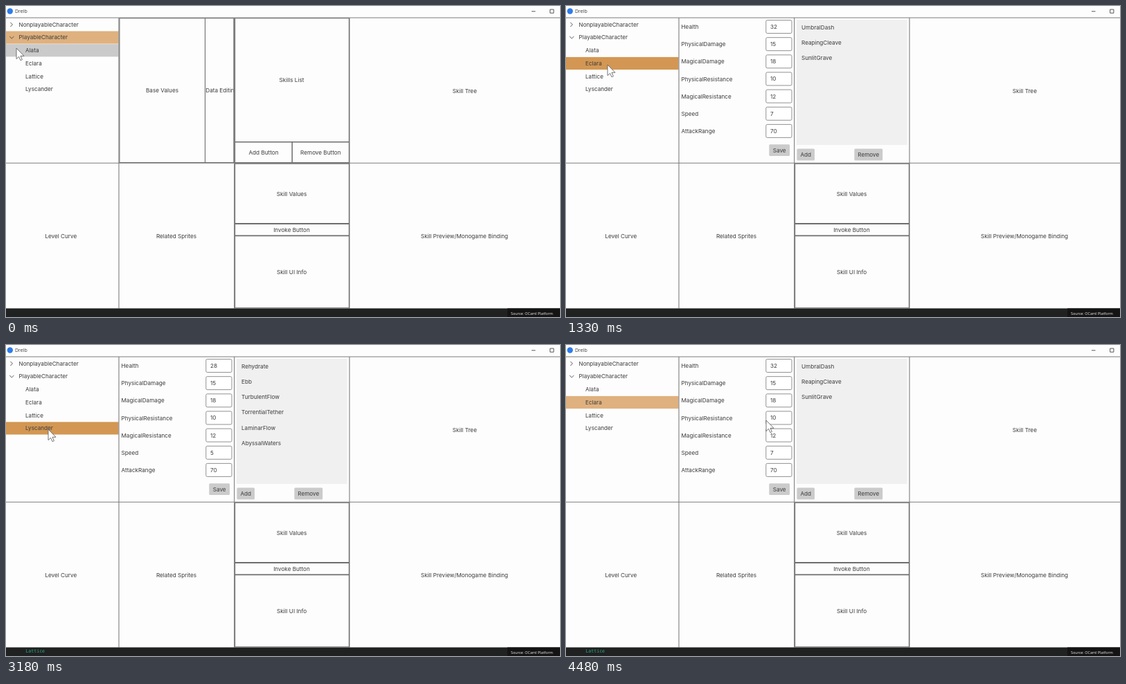
These frames come from a looping animation (800x450 px, 4.51 s). An HTML page:

```html
<!DOCTYPE html>
<html lang="en">
<head>
<meta charset="utf-8">
<title>Character editor</title>
<style>
  html, body { margin: 0; width: 100%; height: 100%; overflow: hidden; background: #fdfdfd; }
  svg { display: block; width: 100vw; height: 100vh; }
  text { font: 8.16px Inter, sans-serif; fill: #3c3c3c; white-space: pre; }
  .line { fill: none; stroke: #7d7d7d; stroke-width: 1.1; }
  .box { fill: none; stroke: #6e6e6e; stroke-width: 1.1; }
  .icon { fill: none; stroke: #444; stroke-width: .9; }
  .input { fill: #fff; stroke: #777; stroke-width: .8; }
  .button { fill: #cbcbcb; }
  text.title { font: 7px "Open Sans", sans-serif; }
  text.status { font: 5.45px "Open Sans", sans-serif; fill: #f2f2f2; }
  text.log { font: 6.6px "DejaVu Sans Mono", monospace; fill: #2fa88a; }
</style>
</head>
<body>
<svg id="stage" viewBox="0 0 800 450"></svg>
<script>
const LOOP = 4510;
const stage = document.getElementById('stage');

function add(tag, attrs, parent = stage) {
  const el = document.createElementNS('http://www.w3.org/2000/svg', tag);
  for (const key in attrs) el.setAttribute(key, attrs[key]);
  parent.appendChild(el);
  return el;
}
const group = () => add('g', {});
const path = (d, cls, parent) => add('path', { d, class: cls }, parent);
const rect = (x, y, width, height, attrs, parent) =>
  add('rect', { x, y, width, height, ...attrs }, parent);

// y is the middle of the capital letters
function label(str, x, y, attrs, parent) {
  const el = add('text', { x, y: y + 2.95, ...attrs }, parent);
  el.textContent = str;
  return el;
}
const centred = (str, x, y, parent) => label(str, x, y, { 'text-anchor': 'middle' }, parent);
const show = (el, on) => el.setAttribute('visibility', on ? 'visible' : 'hidden');

const STATS = ['Health', 'PhysicalDamage', 'MagicalDamage', 'PhysicalResistance',
  'MagicalResistance', 'Speed', 'AttackRange'];
const CHARACTERS = {
  Alata: { stats: [26, 6, 23, 5, 12, 6, 120], skills: ['Comatose', 'Daydream', 'Dreameater'] },
  Eclara: { stats: [32, 15, 18, 10, 12, 7, 70], skills: ['UmbralDash', 'ReapingCleave', 'SunlitGrave'] },
  Lattice: {
    stats: [70, 15, 18, 10, 12, 5, 70],
    skills: ['Refract', 'Anisotropy', 'Fracture', 'DimensionalPhase', 'DimensionalCollapse',
      'Tenebrescence', 'Rupture', 'Shatter']
  },
  Lyscander: {
    stats: [28, 15, 18, 10, 12, 5, 70],
    skills: ['Rehydrate', 'Ebb', 'TurbulentFlow', 'TorrentialTether', 'LaminarFlow', 'AbyssalWaters']
  }
};
const ROWS = ['NonplayableCharacter', 'PlayableCharacter', ...Object.keys(CHARACTERS)];
const rowY = i => 26.8 + 18.73 * i;

const CLICKS = [[0, 'PlayableCharacter'], [300, 'Alata'], [1270, 'Eclara'], [2240, 'Lattice'],
  [2940, 'Lyscander'], [3630, 'Lattice'], [4200, 'Eclara']];
const LOG_TIME = 2270;

// time, x, y of the pointer tip
const POINTER = [[0, 15, 61], [90, 15, 61], [280, 32, 63], [400, 34, 64], [610, 42, 72],
  [850, 56, 101], [1090, 60, 85], [1400, 60, 85], [1700, 66, 99], [1790, 67, 101],
  [2270, 67, 101], [2450, 64, 120], [2610, 61, 122], [3420, 61, 122], [3600, 62, 104],
  [3720, 62, 103], [3900, 64, 91], [4220, 64, 91], [4480, 289, 109], [LOOP, 289, 109]];

// title bar
rect(0, 0, 800, 450, { fill: '#fdfdfd' });
add('circle', { cx: 5.8, cy: 7.5, r: 4.2, fill: '#2f7be8' });
label('Drelb', 13, 7.2, { class: 'title' });
path('M759 7.8h5.5M785.7 5h5.2v5.2h-5.2z', 'icon');

// tree
const rowBars = ROWS.map((_, i) => rect(0, rowY(i) - 9.1, 162.5, 18.2, {}));
ROWS.forEach((name, i) => label(name, i < 2 ? 18.5 : 28, rowY(i)));
path('M6.4 23.8l3 3.1-3 3.1M5.2 44l3.1 3 3.1-3', 'icon');

// panes
path('M0 17H800M0 227.2H800M163 17V437.5M329.7 17V437.5M496 17V437.5', 'line');
path('M330.6 228.1H495.4V314.6H330.6zM330.6 315.4H495.4V332H330.6zM330.6 332.6H495.4V436.8H330.6z', 'box');
[['Skill Tree', 662.3, 123], ['Level Curve', 79.3, 333.3], ['Related Sprites', 246, 333.3],
  ['Skill Values', 412.5, 272], ['Invoke Button', 412.5, 324], ['Skill UI Info', 412.5, 385.3],
  ['Skill Preview/Monogame Binding', 662, 333.3]].forEach(args => centred(...args));

// empty panes, before a character is chosen
const empty = group();
path('M163.9 17.7H287.5V226.5H163.9zM287.5 17.7H328.9V226.5H287.5zM330.6 17.7H495.4V196.6H330.6z' +
  'M330.6 197H413V226.5H330.6zM413.4 197H495.4V226.5H413.4z', 'box', empty);
const clip = add('clipPath', { id: 'cell' });
rect(287, 100, 41.4, 40, {}, clip);
centred('Base Values', 225.5, 122.3, empty);
label('Data Editing', 288.3, 122.3, { 'clip-path': 'url(#cell)' }, empty);
centred('Skills List', 412.5, 107.5, empty);
centred('Add Button', 372, 212, empty);
centred('Remove Button', 454.3, 212, empty);

// details of the chosen character
const details = group();
const values = STATS.map((name, i) => {
  const y = 30 + 25.15 * i;
  label(name, 166.5, y + .2, {}, details);
  rect(288.8, y - 9.5, 37.2, 19, { rx: 1.8, class: 'input' }, details);
  return label('', 295, y, {}, details);
});
rect(333, 20, 159.7, 181, { fill: '#f0f0f0' }, details);
const skills = Array.from({ length: 8 }, (_, i) => label('', 340, 30.9 + 22.2 * i, {}, details));
[['Save', 293.3, 200.2, 29.8], ['Add', 333.4, 206.6, 25.6], ['Remove', 416.4, 206.6, 40.8]]
  .forEach(([name, x, y, w]) => {
    rect(x, y, w, 16.8, { rx: 1.5, class: 'button' }, details);
    centred(name, x + w / 2, y + 8.4, details);
  });

// bottom bar
rect(0, 437.5, 800, 12.5, { fill: '#202121' });
rect(724, 437.5, 76, 12.5, { fill: '#141414' });
label('Source: OCaml Platform', 729, 443.6, { class: 'status' });
const log = label('Lattice', 28.3, 441.9, { class: 'log' });

const pointer = add('path', {
  d: 'M0 0V15.6L3.6 12.3 6 17.7 8.4 16.6 6 11.3H11z',
  fill: '#fff', stroke: '#555', 'stroke-width': .8, 'stroke-linejoin': 'round'
});

function pointerAt(t) {
  const i = Math.max(1, POINTER.findIndex(key => key[0] > t));
  const [t0, x0, y0] = POINTER[i - 1], [t1, x1, y1] = POINTER[i];
  const p = (t - t0) / (t1 - t0), e = p * p * (3 - 2 * p);
  return [x0 + (x1 - x0) * e, y0 + (y1 - y0) * e];
}

function rowColour(selected, hovered) {
  if (selected) return hovered ? '#d39753' : '#dfb17f';
  return hovered ? '#cacaca' : 'none';
}

function render(t) {
  const [x, y] = pointerAt(t);
  pointer.setAttribute('transform', `translate(${x} ${y})`);

  const chosen = CLICKS.filter(([time]) => time <= t).pop()[1];
  rowBars.forEach((bar, i) => {
    const hovered = x < 163 && Math.abs(y - rowY(i)) < 9.36;
    bar.setAttribute('fill', rowColour(ROWS[i] === chosen, hovered));
  });

  const character = CHARACTERS[chosen];
  show(empty, !character);
  show(details, character);
  if (character) {
    values.forEach((el, i) => { el.textContent = character.stats[i]; });
    skills.forEach((el, i) => { el.textContent = character.skills[i] || ''; });
  }
  show(log, t >= LOG_TIME);
}

const start = performance.now();
function tick() {
  render((performance.now() - start) % LOOP);
  requestAnimationFrame(tick);
}
tick();
</script>
</body>
</html>
```
